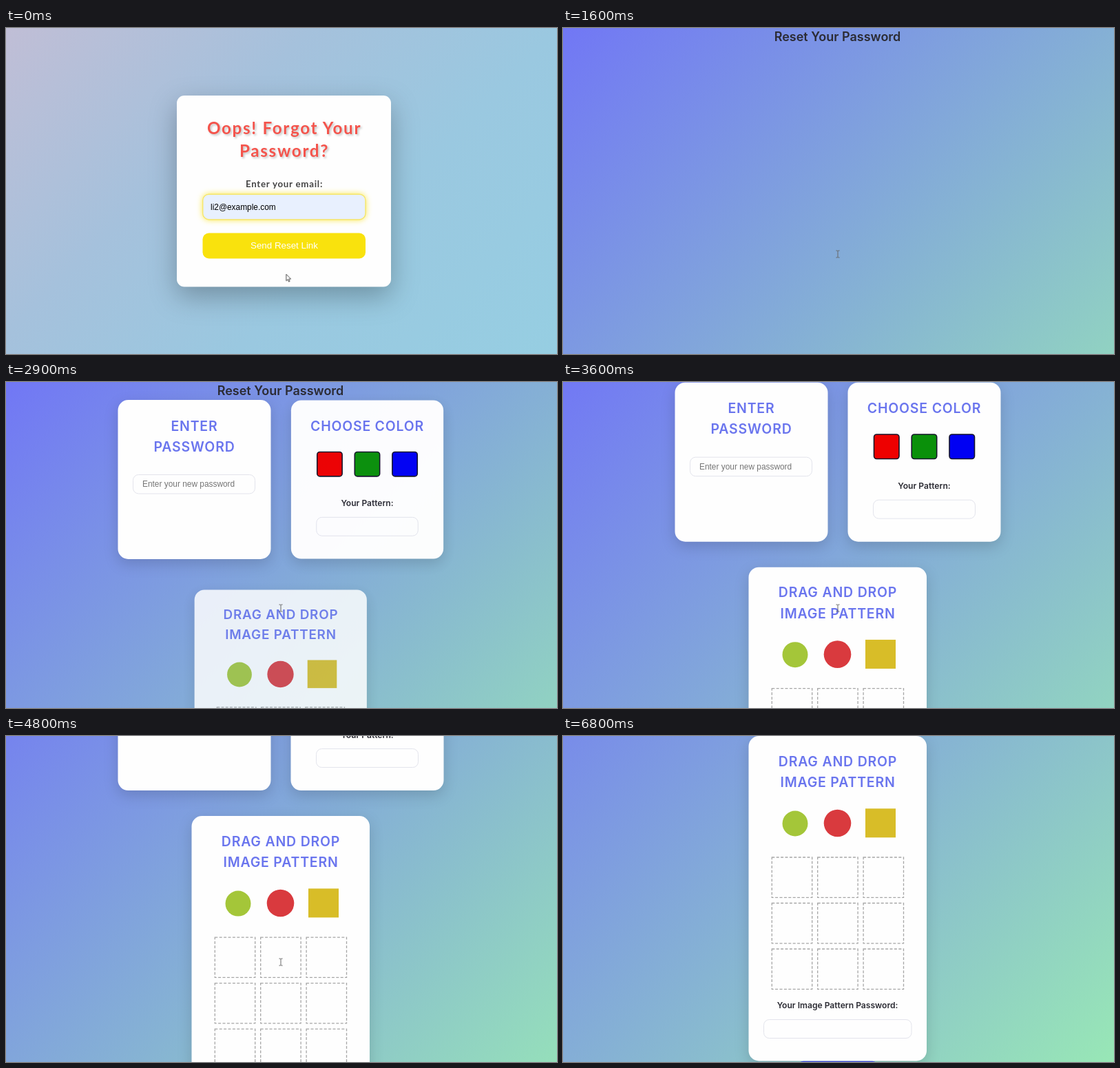
These frames come from a looping animation (800x473 px, 6.9 s). An HTML page:

```html
<!DOCTYPE html>
<html lang="en">
<head>
<meta charset="utf-8">
<title>Password reset</title>
<style>
  html, body { margin: 0; width: 100%; height: 100%; overflow: hidden; }
  svg { display: block; width: 100vw; height: 100vh; }
  text { text-anchor: middle; font-family: Inter, "Open Sans", sans-serif; font-weight: 600; }
  .comic { font-family: Lato, "Open Sans", sans-serif; font-weight: 700; }
  .arial { font: 400 11.9px "Liberation Sans", Arial, sans-serif; }
  .left { text-anchor: start; }
  .oops { font-size: 24.2px; letter-spacing: 1.7px; fill: #f4544c; filter: drop-shadow(2px 2px 1.5px rgba(0,0,0,.22)); }
  .head { font-size: 19.5px; letter-spacing: .8px; fill: #6a75ee; }
  .label { font-size: 12.1px; fill: #2b2b33; }
  .panel { fill: #fefefe; filter: drop-shadow(0 7px 10px rgba(0,0,0,.15)); }
  .field { fill: #fefefe; stroke: #e3e4ec; }
  .pop { transform-box: fill-box; transform-origin: center; }
  .swatches rect { stroke: #15152a; stroke-width: 1.6; }
  .cells rect { fill: none; stroke: #a6a6a6; stroke-width: 1.3; stroke-dasharray: 4 2.4; }
</style>
</head>
<body>
<svg viewBox="0 0 800 473">
  <defs>
    <linearGradient id="sky" gradientUnits="userSpaceOnUse" x1="0" y1="0" x2="636.5" y2="636.5">
      <stop offset="0" stop-color="#c0bed6"/>
      <stop offset=".35" stop-color="#a5c1dc"/>
      <stop offset=".63" stop-color="#9ac8e0"/>
      <stop offset="1" stop-color="#96cee2"/>
    </linearGradient>
    <linearGradient id="mint" gradientUnits="userSpaceOnUse" x1="0" y1="0" x2="783.5" y2="783.5">
      <stop offset="0" stop-color="#7177f5"/>
      <stop offset="1" stop-color="#98e7b6"/>
    </linearGradient>
  </defs>

  <g id="forgot">
    <rect width="800" height="473" fill="url(#sky)"/>
    <rect x="248" y="98" width="311" height="277.5" rx="11" fill="#fefefe"
      style="filter:drop-shadow(0 14px 19px rgba(0,0,0,.27))"/>
    <g class="oops">
      <text class="comic" x="404" y="154">Oops! Forgot Your</text>
      <text class="comic" x="404" y="187">Password?</text>
    </g>
    <text class="comic" x="404" y="231" font-size="13.3" letter-spacing=".75" fill="#444">Enter your email:</text>
    <rect x="285.7" y="241.2" width="236.3" height="36.8" rx="9" fill="#e8f0fe" stroke="#f6e66a" stroke-width="1.4"
      style="filter:drop-shadow(0 0 4px rgba(250,226,20,.75))"/>
    <text class="arial left" x="297" y="264">li2@example.com</text>
    <rect x="285.5" y="297.5" width="236.5" height="37" rx="9" fill="#f9e20d"/>
    <text class="arial" x="404" y="320" fill="#fff" style="font-size:13.35px">Send Reset Link</text>
  </g>

  <g id="reset">
    <g id="page">
      <rect width="800" height="800" fill="url(#mint)"/>
      <text x="398.5" y="18.5" font-size="18" fill="#2b2b33">Reset Your Password</text>

      <g class="pop">
        <rect class="panel" x="162.5" y="26" width="222" height="231" rx="15"/>
        <text class="head" x="273.5" y="70.5">ENTER</text>
        <text class="head" x="273.5" y="100.5">PASSWORD</text>
        <rect class="field" x="184.5" y="134.5" width="177" height="27.5" rx="8"/>
        <text class="arial left" x="198" y="152" fill="#757575">Enter your new password</text>
      </g>

      <g class="pop">
        <rect class="panel" x="413.5" y="26" width="222" height="231" rx="15"/>
        <text class="head" x="524.5" y="70.5">CHOOSE COLOR</text>
        <g class="swatches">
          <rect x="451.5" y="101.3" width="36.5" height="35.6" rx="4" fill="#ee0000"/>
          <rect x="506.2" y="101.3" width="36.5" height="35.6" rx="4" fill="#0a900a"/>
          <rect x="561" y="101.3" width="36.5" height="35.6" rx="4" fill="#0000f3"/>
        </g>
        <text class="label" x="524.5" y="180.5">Your Pattern:</text>
        <rect class="field" x="450.5" y="196.5" width="148" height="27" rx="8"/>
      </g>

      <g class="pop">
        <rect class="panel" x="269.5" y="294" width="258.5" height="471.5" rx="15"/>
        <text class="head" x="399" y="337.5">DRAG AND DROP</text>
        <text class="head" x="399" y="368">IMAGE PATTERN</text>
        <circle cx="337" cy="421" r="18.5" fill="#a4c639"/>
        <circle cx="398.5" cy="420.5" r="19.8" fill="#d93a3e"/>
        <rect x="439" y="399.3" width="44" height="42" fill="#d8bd28"/>
        <g class="cells" id="cells"></g>
        <text class="label" x="398.5" y="689">Your Image Pattern Password:</text>
        <rect class="field" x="291.5" y="705.5" width="214.5" height="27" rx="8"/>
      </g>

      <rect x="341" y="765.7" width="116" height="34" rx="8" fill="#4048d8"/>
    </g>
  </g>

  <g id="cursor">
    <path id="arrow" d="M0 0v9.6l2.2-2 1.5 3.3 1.5-.6-1.5-3.3h3.1z" fill="#fff" stroke="#222" stroke-width=".8"/>
    <path id="beam" d="M-2.5-5h2l.5.5.5-.5h2M0-4.5v9M-2.5 5h2l.5-.5.5.5h2" fill="none" stroke="#666" stroke-width="1"/>
    <path id="hand" d="M-1.4 0v-4.2q0-1.2 1-1.2t1 1.2v2.7l3 .7q1 .3.9 1.5l-.6 3.3-1 1.8h-3.6l-2.8-3.6q-.6-1.1.3-1.4z"
      fill="#fff" stroke="#222" stroke-width=".8"/>
  </g>
</svg>

<script>
  const LOOP = 6900;
  const $ = id => document.getElementById(id);
  const clock = document.timeline.currentTime || 0;

  // steps: [time, properties, easing towards the next step]
  function play(el, steps) {
    const last = steps[steps.length - 1];
    const frames = [...steps, [LOOP, last[1]]].map(([t, props, easing = 'linear']) =>
      ({ ...props, offset: t / LOOP, easing }));
    el.animate(frames, { duration: LOOP, iterations: Infinity }).startTime = clock;
  }

  const shift = (x, y) => ({ transform: `translate(${x}px, ${y}px)` });

  // Visible only within the given [from, to] spans.
  function show(el, ...spans) {
    const steps = [];
    if (spans[0][0] > 0) steps.push([0, { visibility: 'hidden' }, 'step-end']);
    for (const [from, to] of spans) {
      steps.push([from, { visibility: 'visible' }, 'step-end']);
      if (to < LOOP) steps.push([to, { visibility: 'hidden' }, 'step-end']);
    }
    play(el, steps);
  }

  for (let i = 0; i < 9; i++) {
    const cell = document.createElementNS('http://www.w3.org/2000/svg', 'rect');
    const box = { x: 303.3 + i % 3 * 66.4, y: 470 + Math.floor(i / 3) * 66.5, width: 58.4, height: 58.4 };
    for (const key in box) cell.setAttribute(key, box[key]);
    $('cells').append(cell);
  }

  show($('forgot'), [0, 1500]);
  show($('reset'), [1500, LOOP]);

  const small = { opacity: 0, transform: 'scale(.8)' };
  const full = { opacity: 1, transform: 'scale(1)' };
  document.querySelectorAll('.pop').forEach((card, i) => {
    const start = 1780 + i * 290;
    play(card, [[0, small], [start, small, 'ease'], [start + 1000, full]]);
  });

  play($('page'), [
    [0, shift(0, 0)], [3500, shift(0, 0)], [3600, shift(0, -25)],
    [3700, shift(0, -62)], [3850, shift(0, -88)],
    [4500, shift(0, -88), 'ease-in-out'], [5150, shift(0, -294)]
  ]);

  play($('cursor'), [
    [0, shift(406.8, 357.2), 'ease-in-out'], [600, shift(399, 328)],
    [4900, shift(399, 328), 'ease-in-out'], [5450, shift(404.5, 36)]
  ]);
  show($('arrow'), [0, 400]);
  show($('hand'), [400, 1500], [3850, 4500]);
  show($('beam'), [1500, 3850], [4500, 5800]);
</script>
</body>
</html>
```
